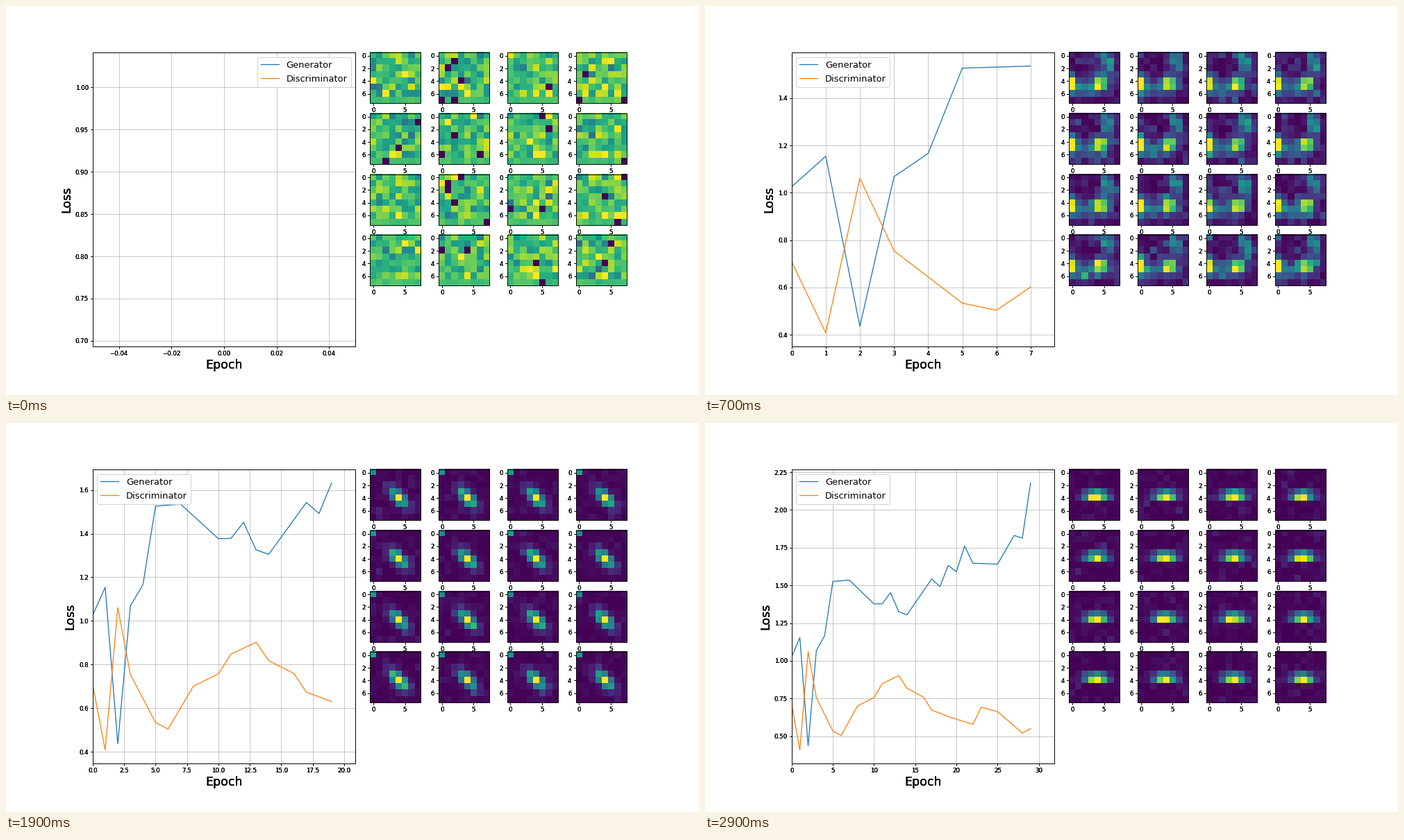
Recreate the animation shown at these times as a matplotlib script. Size 998 px wide and 561 px high, loop 3100 ms.

```python
import numpy as np
import matplotlib.pyplot as plt
from matplotlib.animation import FuncAnimation
from matplotlib.patches import Rectangle

WIDTH, HEIGHT, DPI = 998, 561, 62.375
LAST_EPOCH, STEP_MS, FRAMES = 29, 100, 31
OVERDRAW = 3  # axes decorations are stacked, which darkens their edges
SIZE = 8      # cells along one side of a sample


def curve(turns):
    """Loss per epoch, straight between its turning points."""
    return np.interp(range(LAST_EPOCH + 1), list(turns), list(turns.values()))


generator = curve({
    0: 1.0253, 1: 1.154, 2: 0.436, 3: 1.068, 4: 1.166, 5: 1.526, 7: 1.535,
    10: 1.377, 11: 1.378, 12: 1.452, 13: 1.3255, 14: 1.305, 17: 1.543,
    18: 1.492, 19: 1.632, 20: 1.591, 21: 1.761, 22: 1.647, 25: 1.641,
    27: 1.831, 28: 1.814, 29: 2.179})
discriminator = curve({
    0: 0.7092, 1: 0.4078, 2: 1.061, 3: 0.755, 5: 0.534, 6: 0.504, 8: 0.7,
    10: 0.757, 11: 0.848, 13: 0.9016, 14: 0.8175, 16: 0.759, 17: 0.673,
    19: 0.63, 22: 0.578, 23: 0.6915, 25: 0.662, 28: 0.521, 29: 0.5495})

rows, cols = np.mgrid[:SIZE, :SIZE]


def blob(row, col, height=0.3, width=0.3, level=1.0, tilt=0.0):
    u, v = (rows - row) / height, (cols - col) / width
    return level * np.exp(-(u * u + v * v - 2 * tilt * u * v) / 2)


# Mean look of the samples at key epochs
diagonal = blob(4, 4, 0.75, 0.72, tilt=0.65)
LOOKS = {
    0: 0.7 + blob(6, 4, level=0.3),
    3: (0.44 + blob(5, 1, level=0.5) + blob(6, 4, level=0.45)
        + blob(1, 5, 1, 0.4, 0.3) + blob(3, 6, 2.5, 0.4, -0.28)),
    7: (blob(4.4, -0.2, 0.9, 0.6) + blob(4.5, 4.4, 0.8, 0.8, 0.95)
        + blob(1, 5.5, 1.1, 0.6, 0.5, 0.4) + blob(5.2, 1.5, 0.8, 1.5, 0.3)),
    11: diagonal + blob(4, 0, level=0.5),
    19: diagonal + blob(0, 0, level=0.47),
    26: blob(3.65, 4.3, 0.42, 1.3) + blob(2, 0, level=0.3),
    29: blob(3.65, 3.8, 0.42, 1.15),
}
KEYS = sorted(LOOKS)


def samples(epoch):
    """Sixteen noisy variants of the look blended for this epoch."""
    rng = np.random.default_rng(500 + epoch)
    shape = (16, SIZE, SIZE)
    i = min(np.searchsorted(KEYS, epoch, side="right"), len(KEYS) - 1)
    start, end = KEYS[i - 1], KEYS[i]
    u = (epoch - start) / (end - start)
    look = (1 - u) * LOOKS[start] + u * LOOKS[end]

    rough = np.interp(epoch, [3, 7], [0.12, 0])
    speck = np.interp(epoch, [3, 7, 11], [0, 0.06, 0.018])
    dead = np.interp(epoch, [0, 7], [0.05, 0])
    calm = np.where(rows == SIZE - 1, 0.25, 1)
    cells = look / look.max() * (1 + 0.08 * calm * rng.standard_normal(shape))
    cells += rough * calm * rng.standard_normal(shape)
    cells += speck * rng.exponential(size=shape)
    cells[(rng.random(shape) < dead) & (look < 0.9)] = 0
    cells = np.clip(cells, 0, 1)
    return cells / cells.max(axis=(1, 2), keepdims=True)


fig = plt.figure(figsize=(16, 8.994), dpi=DPI, facecolor="white")
grid = fig.add_gridspec(5, 8, left=0.125, right=0.9, bottom=0.125, top=0.88,
                        wspace=0.2, hspace=0.2)

# Loss chart
chart = fig.add_subplot(grid[:, :4])
chart.grid(True)
chart.set_axisbelow(True)
gen_line, = chart.plot([], [], color="tab:blue", label="Generator")
disc_line, = chart.plot([], [], color="tab:orange", label="Discriminator")
legend = chart.legend(loc="upper right", fontsize=15, framealpha=1)
layers = [chart]
for _ in range(OVERDRAW - 1):
    layer = fig.add_subplot(grid[:, :4], sharex=chart, sharey=chart)
    layer.patch.set_visible(False)
    layers.append(layer)
for layer in layers:
    layer.set_xlabel("Epoch", fontsize=20)
    layer.set_ylabel("Loss", fontsize=20)

# Sample panels, drawn in pixels on one canvas
canvas = fig.add_axes([0, 0, 1, 1])
TICK = 3.5 * DPI / 72
INK = dict(color="black", lw=1.1)


def add_panel(row, col):
    box = grid[row, 4 + col].get_position(fig)
    side = box.height * HEIGHT
    left = (box.x0 + box.x1) / 2 * WIDTH - side / 2
    top = (1 - box.y1) * HEIGHT
    right, bottom = left + side, top + side
    image = canvas.imshow(np.zeros((SIZE, SIZE)), vmin=0, vmax=1,
                          extent=(left, right, bottom, top), aspect="auto",
                          interpolation="nearest", zorder=1)
    canvas.add_patch(Rectangle((left, top), side, side, fill=False, zorder=3,
                               **INK))
    for v in (0, 2, 4, 6):
        y = top + (v + 0.5) * side / SIZE
        canvas.plot([left - TICK, left], [y, y], **INK)
        for _ in range(OVERDRAW):
            canvas.text(left - 2 * TICK, y, v, ha="right",
                        va="center_baseline")
    for v in (0, 5):
        x = left + (v + 0.5) * side / SIZE
        canvas.plot([x, x], [bottom, bottom + TICK], **INK)
        for _ in range(OVERDRAW):
            canvas.text(x, bottom + 2 * TICK, v, ha="center", va="top")
    return image


panels = [add_panel(r, c) for r in range(4) for c in range(4)]
canvas.set_xlim(0, WIDTH)
canvas.set_ylim(HEIGHT, 0)
canvas.axis("off")


def free_corner(epoch):
    """First corner in which the legend covers no curve."""
    x = np.linspace(0, epoch, 600)
    (x0, x1), (y0, y1) = chart.get_xlim(), chart.get_ylim()
    u = (x - x0) / (x1 - x0)
    losses = [np.interp(x, range(LAST_EPOCH + 1), loss)
              for loss in (generator, discriminator)]
    v = (np.array(losses) - y0) / (y1 - y0)
    for corner in ("upper right", "upper left", "lower left", "lower right"):
        beside = u > 1 - 0.376 if "right" in corner else u < 0.376
        level = v > 1 - 0.115 if "upper" in corner else v < 0.115
        if not (beside & level).any():
            return corner
    return "upper left"


def update(frame):
    epoch = min(frame, LAST_EPOCH)
    x = np.arange(epoch + 1)
    losses = generator[:epoch + 1], discriminator[:epoch + 1]
    gen_line.set_data(x, losses[0])
    disc_line.set_data(x, losses[1])
    low, high = np.min(losses), np.max(losses)
    pad = 0.05 * (high - low)
    chart.set_ylim(low - pad, high + pad)
    chart.set_xlim(*((0, 1.1 * epoch) if epoch else (-0.05, 0.05)))
    legend.set_loc(free_corner(epoch))
    for panel, cells in zip(panels, samples(epoch)):
        panel.set_data(cells)
    return [gen_line, disc_line, *panels]


anim = FuncAnimation(fig, update, frames=FRAMES, interval=STEP_MS,
                     init_func=lambda: update(0), repeat=True,
                     repeat_delay=0, blit=False)
plt.show()
```
